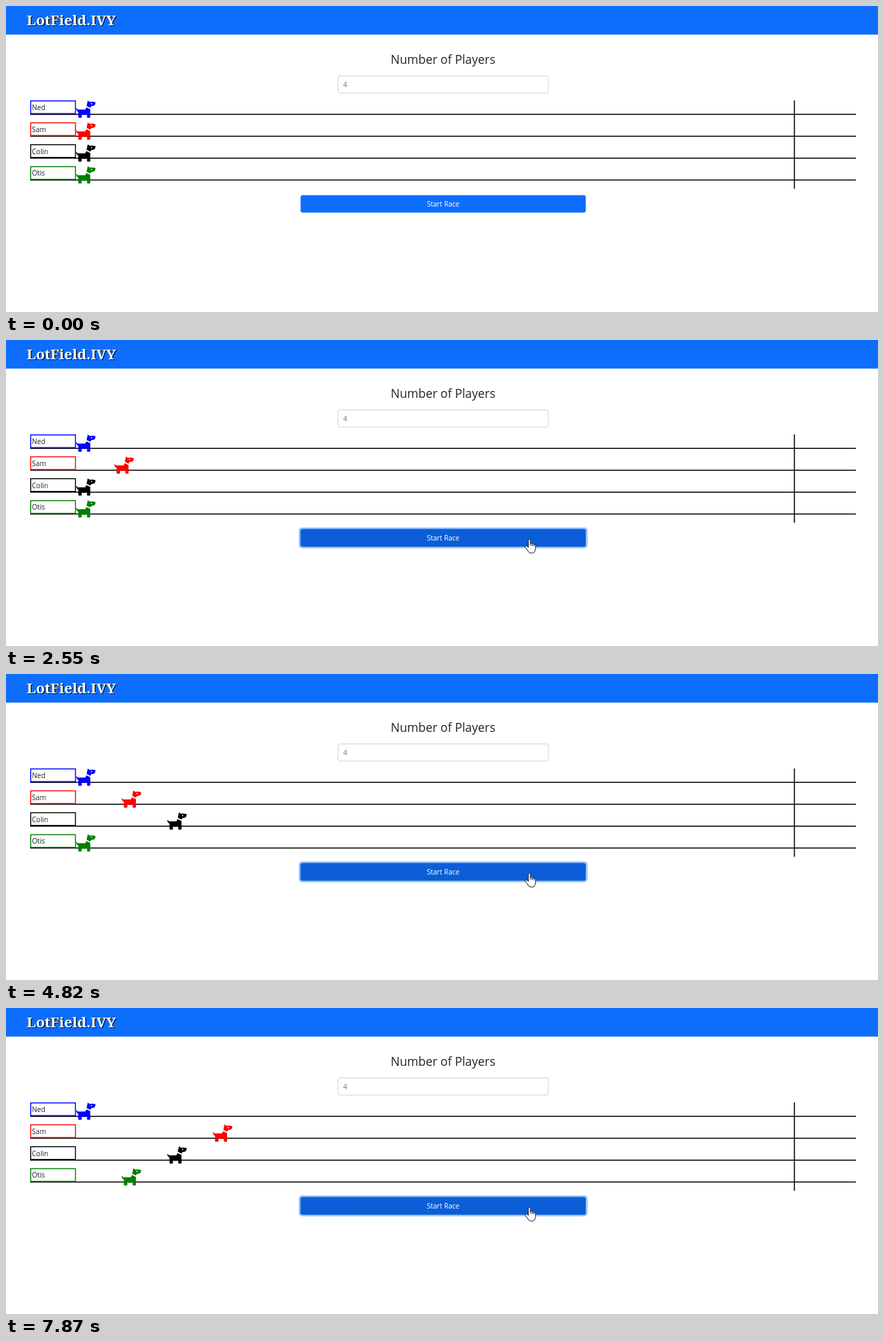
Recreate the animation shown at these times as an HTML page. Size 1262x444 px, loop 8 s.

```html
<!DOCTYPE html>
<html lang="en">
<head>
<meta charset="utf-8">
<title>Dog race</title>
<style>
  html, body { margin: 0; width: 100%; height: 100%; overflow: hidden; background: #fff; }
  svg { display: block; }
  text { font: 10.1px "Open Sans", "Noto Sans", sans-serif; fill: #212529; }
  .brand { font: 900 20.5px "Noto Serif", "Liberation Serif", serif; }
  .title { font-size: 17.4px; }
  .mid { text-anchor: middle; }
  .rule { stroke: #000; stroke-width: 1.5; }
  .name { fill: none; stroke: currentColor; stroke-width: 1.4; }
  .dog { fill: currentColor; }
  .pointer { fill: #fff; stroke: #10152e; stroke-width: 1; stroke-linejoin: round; }
</style>
</head>
<body>
<svg width="1262" height="444" viewBox="0 0 1262 444">
  <defs>
    <g id="dog">
      <path d="M17.3 .2 20.2 2.2 24 1.8 28.5 2.6Q28.7 6.5 26 7.8L22.5 8.3 21 10.7 15.6 8Z"/>
      <path d="M.2 11.6Q1.7 10.7 2.5 13.2H13.5Q14.8 12 15.1 9.9L21 12.7V24.1Q21 25.2 20 25.2H17.2Q16.3 25.2 16.3 24.2V20.5Q12 21.8 8.6 20.5V24.2Q8.6 25.2 7.6 25.2H4.6Q3.6 25.2 3.6 24.2V17Q.8 15.2.2 11.6Z"/>
      <circle cx="22.6" cy="4.7" r=".9" fill="#fff"/>
    </g>
  </defs>

  <rect width="1262" height="41.5" fill="#0d6efd"/>
  <text class="brand" x="31.3" y="29.3" style="fill:#111">LotField.IVY</text>
  <text class="brand" x="30" y="28" style="fill:#fff">LotField.IVY</text>

  <text class="title mid" x="632.5" y="84">Number of Players</text>
  <rect x="480.5" y="101.5" width="304.5" height="24.8" rx="2.5" fill="#fff" stroke="#ced4da"/>
  <text x="488" y="118" style="fill:#6c757d">4</text>

  <g id="lanes"></g>
  <path class="rule" d="M1141 137V265.3"/>

  <rect id="ring" x="423.8" y="271.9" width="417.9" height="30.4" rx="5" fill="#98c1fe"/>
  <rect x="426.4" y="274.6" width="412.6" height="25.1" rx="2.7" fill="#0d6efd"/>
  <rect id="hover" x="426.4" y="274.6" width="412.6" height="25.1" rx="2.7" fill="#0b5ed7"/>
  <text class="mid" x="632.6" y="291" style="fill:#fff">Start Race</text>

  <g id="cursor" class="pointer">
    <path id="arrow" d="M0 0V16L3.7 12.6 6.2 18.5 8.7 17.4 6.2 11.7H11.3Z"/>
    <g id="hand">
      <path d="M-1.5 1.2Q0-1 1.5 1.2V6.2Q3 5 4 6.8 5.6 5.8 6.4 7.6 8.6 7 8.9 9.4V13.6Q8.6 17 6.8 19.2 5.4 20.2 3 20.2 0 20.2-1.5 18.2-3 15-5.9 12.2-6.8 10.2-4.8 9.7-3 10-1.5 12Z"/>
      <path fill="none" d="M1.5 6V9.8M4 6.8V10M6.4 7.6V10.4"/>
    </g>
  </g>
</svg>
<script>
const LOOP = 8000, TICK = 70, STRIDE = 66, RUN = 500;
const $ = id => document.getElementById(id);
const clamp = v => Math.min(1, Math.max(0, v));

const racers = [["Ned", "#00f"], ["Sam", "#f00"], ["Colin", "#000"], ["Otis", "#008000"]];
$("lanes").innerHTML = racers.map(([name, color], i) => `
  <g transform="translate(0 ${137 + i * 31.8})" color="${color}">
    <path class="rule" d="M35 20.2H1230"/>
    <rect class="name" x="35.7" y=".7" width="64.8" height="18.4"/>
    <text x="37.5" y="14">${name}</text>
    <use class="dog" href="#dog"/>
  </g>`).join("");
const dogs = document.querySelectorAll(".dog");

// Each stride: lane, first visible tick, start of the eased run
const strides = [[1, 2340], [2, 3310], [2, 4330], [1, 5350], [3, 6370], [1, 7390]]
  .map(([lane, first], i) => ({ lane, first, start: 2280 + 1010 * i }));

// CSS "ease": cubic-bezier(.25, .1, .25, 1)
function ease(x) {
  if (x <= 0 || x >= 1) return clamp(x);
  const bez = (a, b, u) => 3 * a * u * (1 - u) ** 2 + 3 * b * u * u * (1 - u) + u ** 3;
  let lo = 0, hi = 1;
  for (let i = 0; i < 24; i++) {
    const mid = (lo + hi) / 2;
    if (bez(.25, .25, mid) < x) lo = mid; else hi = mid;
  }
  return bez(.1, 1, lo);
}

function moveDogs(t) {
  const x = [101, 101, 101, 101];
  for (const { lane, first, start } of strides) {
    if (t < first) continue;
    const shown = first + TICK * Math.floor((t - first) / TICK);
    x[lane] += STRIDE * ease((shown - start) / RUN);
  }
  dogs.forEach((dog, i) => dog.setAttribute("transform", `translate(${x[i]} 0)`));
}

function moveCursor(t) {
  const k = Math.min(9, Math.floor((t - 190) / 68.8));
  const p = 1 - (1 - clamp(k / 9)) ** 2;
  const x = 1098 + (757.5 - 1098) * p, y = 414 + (289 - 414) * p;
  const over = k >= 7;
  $("cursor").setAttribute("transform", `translate(${x} ${y})`);
  $("cursor").style.display = t < 190 ? "none" : "";
  $("arrow").style.display = over ? "none" : "";
  $("hand").style.display = over ? "" : "none";
  $("hover").style.opacity = clamp((k - 6) * .45);
  $("ring").style.opacity = t < 1210 ? 0 : clamp(.35 + .45 * Math.floor((t - 1210) / TICK));
}

const begin = performance.now();
function draw() {
  const t = (performance.now() - begin) % LOOP;
  moveDogs(t);
  moveCursor(t);
  requestAnimationFrame(draw);
}
draw();
</script>
</body>
</html>
```
